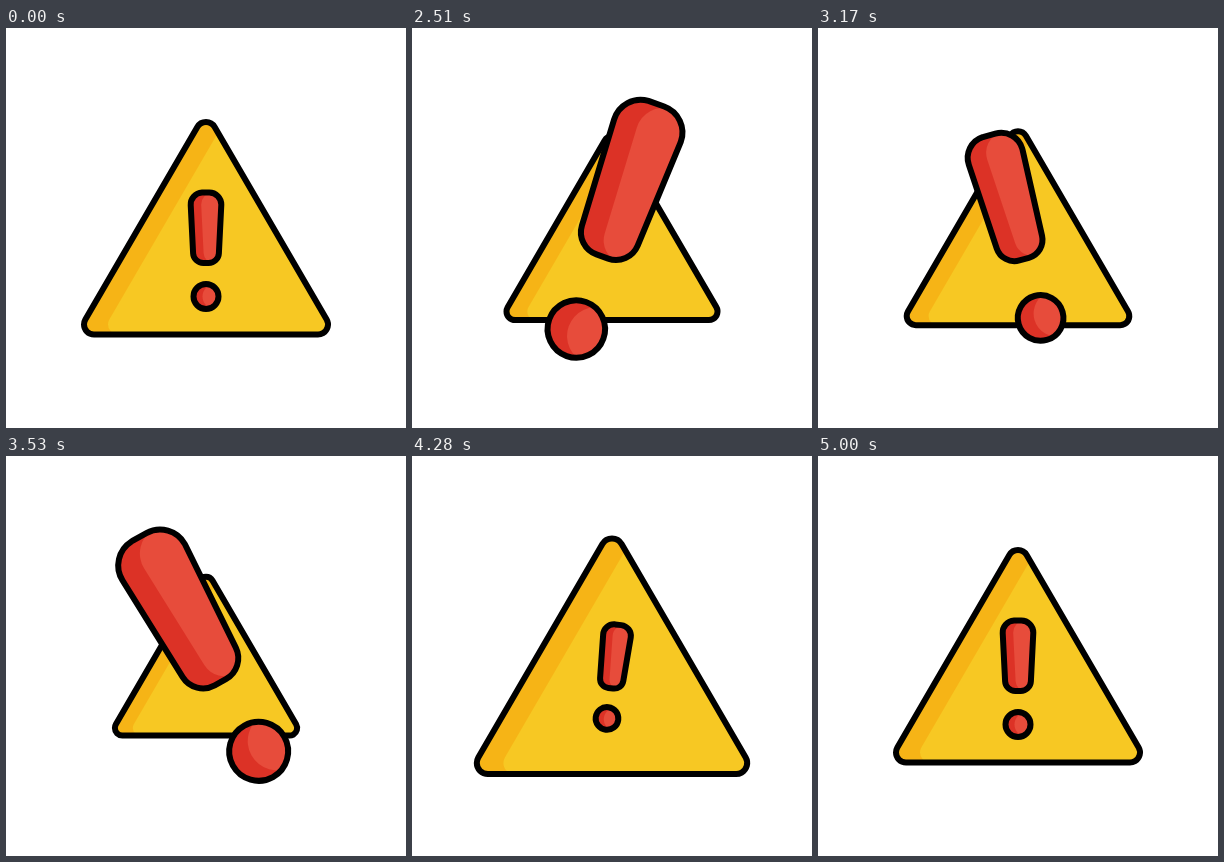
An HTML page with a canvas that plays this animation: 400 px wide and 400 px high, repeating every 5.06 s.

```html
<!DOCTYPE html>
<html lang="en">
<head>
<meta charset="utf-8">
<title>Warning sign</title>
<style>
  html, body { margin: 0; height: 100%; overflow: hidden; background: #fff; }
  canvas { display: block; width: 400px; height: 400px; }
</style>
</head>
<body>
<canvas id="stage" width="400" height="400"></canvas>
<script>
const ctx = document.getElementById('stage').getContext('2d');
const LOOP = 5060, BEGIN = 2000, END = 5000, BEAT = 600, LINE = 6;
const YELLOW = ['#f7c823', '#f6b416'], RED = ['#e74c3b', '#dc3226'];

const radians = degrees => degrees * Math.PI / 180;
const clamp = (v, low, high) => Math.min(high, Math.max(low, v));

// Shape symmetric about x = 0: round corners on the right, top to bottom,
// each {x, y, r, from, to} in degrees, then mirrored on the left
function symmetric(...corners) {
  const path = new Path2D();
  for (const { x, y, r, from, to } of corners)
    path.arc(x, y, r, radians(from), radians(to));
  for (const { x, y, r, from, to } of corners.reverse())
    path.arc(-x, y, r, radians(180 - to), radians(180 - from));
  path.closePath();
  return path;
}

const triangle = symmetric(
  { x: 0, y: -96, r: 10, from: -90, to: -30 },
  { x: 112, y: 96.5, r: 10, from: -30, to: 90 });
const bar = symmetric(
  { x: 3.3, y: -46, r: 12, from: -90, to: 3 },
  { x: 2.7, y: 2.3, r: 10.2, from: 3, to: 90 });
const dot = symmetric({ x: 0, y: 46, r: 12.5, from: -90, to: 90 });

// Poses at the start, on each beat and at the end
const sizes = [1, .857, .952, .74, 1.115, .96, 1];
const zooms = [1, 2.353, 1.697, 2.38, .9, 1.06, 1];
const tilts = [0, 22.6, -12.4, -29.6, 7.3, -2, 0];

// The first and last beats are cut short by the rest
const beatTime = i => clamp(BEGIN + (i - 1 / 3) * BEAT, BEGIN, END);

function swing(poses, time) {
  const t = clamp(time, BEGIN, END - 1);
  let i = 0;
  while (beatTime(i + 1) <= t) i++;
  const part = (t - beatTime(i)) / (beatTime(i + 1) - beatTime(i));
  const ease = (1 - Math.cos(Math.PI * part)) / 2;
  return poses[i] + (poses[i + 1] - poses[i]) * ease;
}

function place(y, scale, tilt = 0) {
  ctx.setTransform(1, 0, 0, 1, 200, y);
  ctx.rotate(radians(tilt));
  ctx.scale(scale, scale);
  ctx.lineWidth = LINE / scale; // line weight stays constant
}

// The light face is the same shape shifted right inside the shaded one
function paint(path, [light, shade], shift) {
  ctx.save();
  ctx.clip(path);
  ctx.fillStyle = shade;
  ctx.fill(path);
  ctx.translate(shift, 0);
  ctx.fillStyle = light;
  ctx.fill(path);
  ctx.restore();
  ctx.stroke(path);
}

function draw(time) {
  const zoom = swing(zooms, time);
  ctx.resetTransform();
  ctx.clearRect(0, 0, 400, 400);
  place(200, swing(sizes, time));
  paint(triangle, YELLOW, 24);
  // the mark rises as it leaves its resting size
  place(222.5 - 16.2 * Math.abs(zoom - 1), zoom, swing(tilts, time));
  paint(bar, RED, 10.5);
  paint(dot, RED, 9);
}

const start = performance.now();
function tick() {
  draw((performance.now() - start) % LOOP);
  requestAnimationFrame(tick);
}
tick();
</script>
</body>
</html>
```
